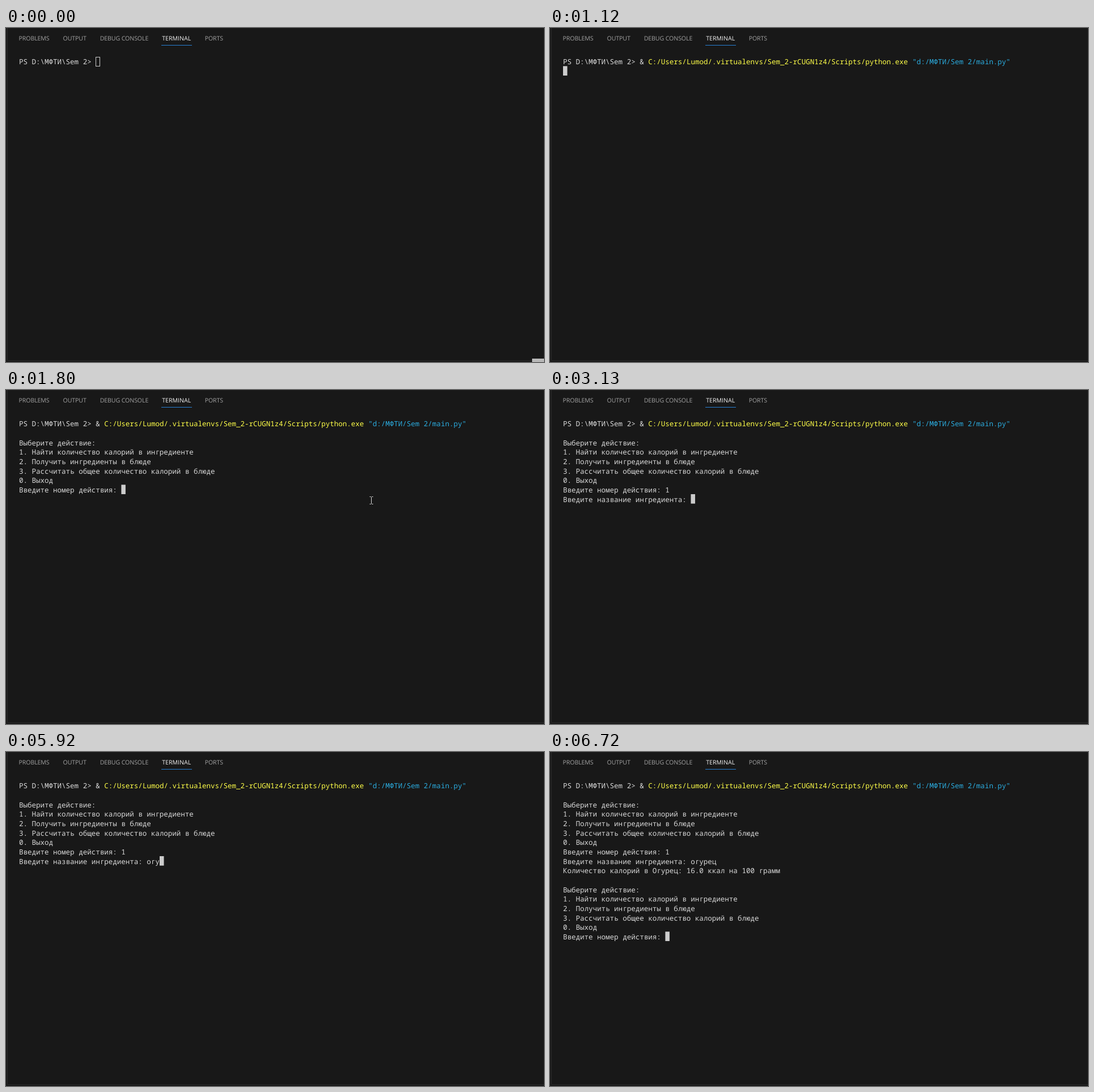
Write an HTML page that moves like this. It is 949x590 px and loops after 8000 ms.

```html
<!DOCTYPE html>
<html lang="ru">
<head>
<meta charset="utf-8">
<title>Terminal</title>
<style>
  html, body { margin: 0; width: 100%; height: 100%; overflow: hidden; background: #181818; }
  svg { display: block; }
  text { white-space: pre; text-rendering: geometricPrecision; }
  .tab { font: 10.6px "Open Sans", "Noto Sans", sans-serif; letter-spacing: -0.1px; fill: #a2a2a2; }
  .active { letter-spacing: 0; fill: #f2f2f2; }
  .row { font: 500 12.525px "Noto Sans Mono", "DejaVu Sans Mono", monospace; fill: #dadada; }
</style>
</head>
<body>
<svg id="stage" width="949" height="590" viewBox="0 0 949 590">
  <rect width="949" height="590" fill="#181818"/>
  <path d="M2.5 0V587.5H949" fill="none" stroke="#2b2b2b"/>
  <g id="tabs"></g>
  <rect x="274" y="30" width="54" height="1" fill="#2880d4"/>
  <g id="rows"></g>
  <rect id="caret"/>
  <path id="mouse" d="M-3 -6.5H-1L0 -5.5L1 -6.5H3M0 -5.5V5.5M-3 6.5H-1L0 5.5L1 6.5H3"
        fill="none" stroke="#dcdcdc"/>
  <rect id="corner" x="928" y="584" width="21" height="6" fill="#b8b8b8"/>
</svg>
<script>
const LOOP = 8000, LEFT = 23, TOP = 50.67, CHAR = 7.515, LINE = 50 / 3, BASELINE = 13.5;
const $ = id => document.getElementById(id);

const PROMPT = 'PS D:\\МФТИ\\Sem 2> ';
const COMMAND = [
  [PROMPT + '& '],
  ['C:/Users/Lumod/.virtualenvs/Sem_2-rCUGN1z4/Scripts/python.exe ', '#ffff48'],
  ['"d:/МФТИ/Sem 2/main.py"', '#2bacdf']
];
const ASK_ACTION = 'Введите номер действия: ';
const ASK_NAME = 'Введите название ингредиента: ';
const MENU = [
  '', 'Выберите действие:',
  '1. Найти количество калорий в ингредиенте',
  '2. Получить ингредиенты в блюде',
  '3. Рассчитать общее количество калорий в блюде',
  '0. Выход', ASK_ACTION
];
const WORD = 'огурец';
const KEY_TIMES = [4920, 5320, 5920, 6050, 6250, 6520];

// Pointer stops: time, x, y; no position means hidden.
const POINTER = [
  [1390, 767, 159], [1470, 724, 169], [1550, 678, 184], [1640, 646, 194],
  [1720, 636, 197], [1800, 644, 195], [2330, 734, 208], [2410, 838, 222],
  [2500, 892, 227], [2580]
];

function add(parent, tag, attrs, text) {
  const el = document.createElementNS('http://www.w3.org/2000/svg', tag);
  set(el, attrs);
  if (text) el.textContent = text;
  return parent.appendChild(el);
}

function set(el, attrs) {
  for (const key in attrs) el.setAttribute(key, attrs[key]);
}

[['PROBLEMS', 22.5], ['OUTPUT', 100.5], ['DEBUG CONSOLE', 165.7], ['TERMINAL', 275.2], ['PORTS', 350.7]]
  .forEach(([name, x]) => add($('tabs'), 'text',
    { x, y: 22, class: name === 'TERMINAL' ? 'tab active' : 'tab' }, name));

function linesAt(t) {
  if (t < 1060) return [PROMPT];
  if (t < 1190) return [COMMAND, ''];
  const lines = [COMMAND, ...MENU];
  if (t >= 2580) lines[7] += '1';
  if (t >= 3130) lines.push(ASK_NAME + WORD.slice(0, KEY_TIMES.filter(k => k <= t).length));
  if (t >= 6720) lines.push('Количество калорий в Огурец: 16.0 ккал на 100 грамм', ...MENU);
  return lines;
}

let shown = '';
function drawRows(lines) {
  const key = JSON.stringify(lines);
  if (key === shown) return;
  shown = key;
  $('rows').replaceChildren();
  lines.forEach((line, i) => {
    let col = 0;
    for (const [text, fill] of Array.isArray(line) ? line : [[line]]) {
      const el = add($('rows'), 'text',
        { x: LEFT + col * CHAR, y: TOP + i * LINE + BASELINE, class: 'row' }, text);
      if (fill) el.style.fill = fill;
      col += text.length;
    }
  });
}

function drawCaret(t, lines) {
  const row = lines.length - 1;
  const x = LEFT + lines[row].length * CHAR, y = TOP + row * LINE;
  const focused = t >= 990;
  set($('caret'), focused
    ? { x, y, width: CHAR, height: LINE, fill: '#cccccc', stroke: 'none' }
    : { x: Math.floor(x) + 0.5, y: Math.ceil(y) + 0.5, width: 7, height: 16, fill: 'none', stroke: '#cccccc' });
  $('caret').style.display = t >= 1060 && t < 1120 ? 'none' : '';
}

function drawPointer(t) {
  const [, x, y] = POINTER.findLast(p => p[0] <= t) || [];
  $('mouse').style.display = x ? '' : 'none';
  if (x) set($('mouse'), { transform: `translate(${x + 0.5} ${y})` });
}

function draw(t) {
  const lines = linesAt(t);
  drawRows(lines);
  drawCaret(t, lines);
  drawPointer(t);
  const faded = [70, 130, 200, 260].filter(k => k <= t).length;
  set($('corner'), { opacity: 1 - faded / 4 });
}

const start = performance.now();
function tick() {
  draw((performance.now() - start) % LOOP);
  requestAnimationFrame(tick);
}
tick();
</script>
</body>
</html>
```
